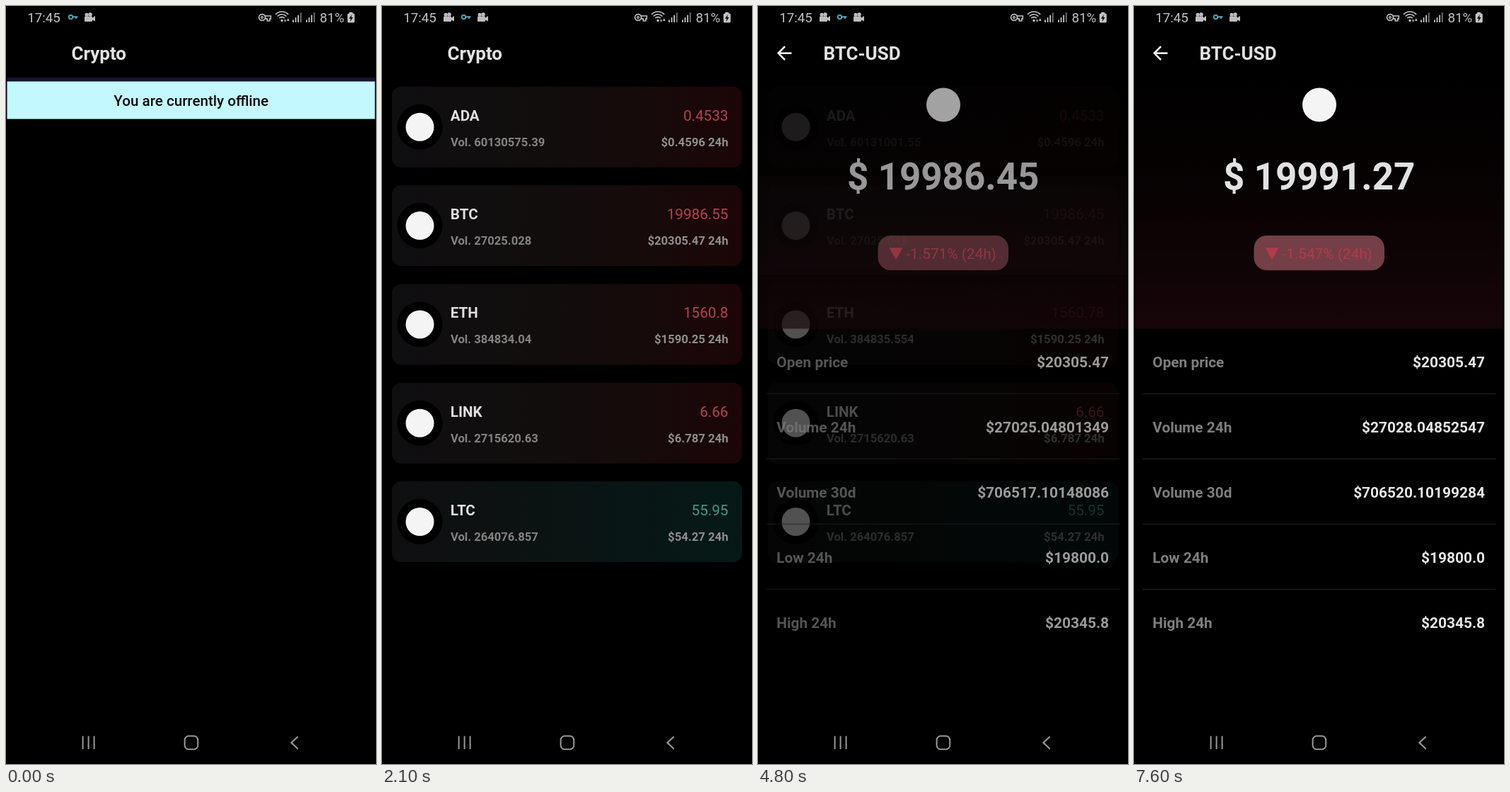
An HTML page with a canvas for the animation above (8100 ms loop, 523x1070 px).

```html
<!DOCTYPE html>
<html lang="en">
<head>
<meta charset="utf-8">
<title>Crypto ticker</title>
<style>
html, body { margin: 0; width: 100%; height: 100%; overflow: hidden; background: #000; }
canvas { display: block; width: 523px; height: 1070px; }
</style>
</head>
<body>
<canvas id="stage"></canvas>
<script>
const W = 523, H = 1070, LOOP = 8100;
const canvas = document.getElementById('stage');
const ratio = window.devicePixelRatio || 1;
canvas.width = W * ratio;
canvas.height = H * ratio;
const c = canvas.getContext('2d');

// Each track lists [time, value]; the latest entry counts.
const coins = [
  { name: 'ADA', open: '0.4596', price: [[0, '0.4529'], [1600, '0.4533']],
    vol: [[0, '60029453.55'], [1600, '60130575.39'], [2800, '60130648.12'], [3800, '60131001.55']] },
  { name: 'BTC', open: '20305.47', price: [[0, '19980.68'], [1700, '19986.55'], [2900, '19986.51'], [3900, '19986.45']],
    vol: [[0, '27029.982'], [1700, '27025.028'], [3100, '27025.031'], [3700, '27025.048']] },
  { name: 'ETH', open: '1590.25', price: [[0, '1560.09'], [1800, '1560.8'], [3200, '1560.79'], [4000, '1560.78']],
    vol: [[0, '384971.38'], [1800, '384834.04'], [3000, '384834.912'], [3600, '384835.554']] },
  { name: 'LINK', open: '6.787', price: [[0, '6.657'], [1700, '6.66']],
    vol: [[0, '2716866.92'], [1700, '2715620.63']] },
  { name: 'LTC', open: '54.27', up: true, price: [[0, '55.9'], [2100, '55.95']],
    vol: [[0, '264194.091'], [1800, '264076.857']] }
];

// [time, price, volume over 24 hours]
const trades = [
  [0, 19986.45, 27025.04801349],
  [5300, 19987.12, 27025.05213349],
  [5500, 19987.83, 27025.05613349],
  [5700, 19987.87, 27025.05733349]
];
for (let i = 1; i <= 9; i++) {
  trades.push([5900 + i * 100, 19987.87 + i * 0.138, 27025.05733349 + i * 0.12417631]);
}
trades.push(
  [6900, 19989.67, 27026.26104004],
  [7100, 19990.04, 27026.71826513],
  [7200, 19990.38, 27027.12073182],
  [7300, 19990.7, 27027.63418547],
  [7500, 19991.27, 27027.94216547],
  [7600, 19991.27, 27028.04852547]
);
const OPEN = 20305.47, VOL_GAP = 679492.05346737;

const latest = (track, t) => track.filter(e => e[0] <= t).pop();

function text(str, x, y, size, weight, color, align = 'left') {
  c.font = `${weight} ${size}px Roboto, sans-serif`;
  c.textAlign = align;
  c.fillStyle = color;
  c.fillText(str, x, y);
}

function box(x, y, w, h, r, fill) {
  c.beginPath();
  c.roundRect(x, y, w, h, r);
  c.fillStyle = fill;
  c.fill();
}

function disc(x, y, r, fill) {
  c.beginPath();
  c.arc(x, y, r, 0, Math.PI * 2);
  c.fillStyle = fill;
  c.fill();
}

function ring(x, y, r, color, width) {
  c.beginPath();
  c.arc(x, y, r, 0, Math.PI * 2);
  c.strokeStyle = color;
  c.lineWidth = width;
  c.stroke();
}

function line(points, color, width) {
  c.beginPath();
  points.forEach(([x, y]) => c.lineTo(x, y));
  c.strokeStyle = color;
  c.lineWidth = width;
  c.stroke();
}

function shape(points, fill) {
  c.beginPath();
  points.forEach(([x, y]) => c.lineTo(x, y));
  c.closePath();
  c.fillStyle = fill;
  c.fill();
}

function gradient(x0, y0, x1, y1, colors) {
  const g = c.createLinearGradient(x0, y0, x1, y1);
  colors.forEach((col, i) => g.addColorStop(i / (colors.length - 1), col));
  return g;
}

function camera(x) {
  const col = '#bdbdbd';
  disc(x + 3, 12.3, 2.5, col);
  disc(x + 8, 12, 2.8, col);
  box(x, 14.5, 11, 7.5, 1, col);
  shape([[x + 10.5, 17], [x + 15, 14], [x + 15, 21.5], [x + 10.5, 19.5]], col);
}

function smallKey(x) {
  const col = '#4fb3c4';
  ring(x + 4, 15.6, 2.8, col, 1.7);
  line([[x + 7, 15.3], [x + 14, 15.3]], col, 1.9);
  line([[x + 11.5, 15], [x + 11.5, 18]], col, 1.8);
}

function statusBar(t) {
  const col = '#c4c4c4';
  text('17:45', 30.3, 22.8, 18.7, 400, col);
  if (t < 400) {
    smallKey(87.5);
    camera(111);
  } else {
    camera(87);
    smallKey(111.5);
    camera(135);
  }
  // outlined key
  ring(362, 16, 4.4, col, 1.6);
  ring(362, 16, 1.4, col, 1.3);
  line([[366, 14], [374.3, 14], [374.3, 18], [372.8, 18], [372.8, 21], [369.2, 21], [369.2, 18], [366, 18]], col, 1.5);
  // wireless
  [12.5, 8.7, 4.9].forEach(r => {
    c.beginPath();
    c.arc(390, 20.5, r, -Math.PI * 0.76, -Math.PI * 0.24);
    c.strokeStyle = col;
    c.lineWidth = 1.6;
    c.stroke();
  });
  disc(390, 20.5, 1.7, col);
  shape([[393, 19.5], [396, 19.5], [394.5, 23]], col);
  shape([[397, 21], [400.5, 21], [398.7, 17]], col);
  [405, 424].forEach(x => {
    for (let i = 0; i < 4; i++) {
      const h = 3.5 + i * 3.4;
      box(x + i * 3.6, 23 - h, 1.8, h, 0, i < 3 ? col : '#777');
    }
  });
  text('81%', 443.4, 22.8, 18.7, 400, col);
  box(485.3, 8.7, 4.6, 3, 0.5, col);
  box(482.7, 10.6, 10, 12.8, 1.6, col);
  shape([[488.8, 12], [484.8, 17.8], [487.2, 17.8], [486.4, 22], [490.7, 16], [488.2, 16]], '#000');
}

function navBar() {
  const col = '#989898';
  [108.6, 116.6, 124.6].forEach(x => line([[x, 1030.5], [x, 1049]], col, 2));
  c.beginPath();
  c.roundRect(252.6, 1030.6, 18.6, 18.6, 5.5);
  c.strokeStyle = col;
  c.lineWidth = 2;
  c.stroke();
  line([[412.6, 1031.3], [403.4, 1040], [412.6, 1048.7]], col, 2.1);
}

function toolbar(t) {
  const col = '#e2e2e2';
  text(t < 4400 ? 'Crypto' : 'BTC-USD', 92.5, 76.3, 26, 700, col);
  if (t < 4400) return;
  line([[47.5, 66.6], [29, 66.6]], '#fff', 2.5);
  line([[38, 57.2], [28.7, 66.6], [38, 76]], '#fff', 2.5);
}

function banner(t) {
  box(1.5, 101, 520, 5.5, 0, '#16132f');
  if (t >= 1200) box(1.5, 101, 51, 5, 0, '#4f7f9c');
  box(1.5, 106.5, 520, 53, 0, '#c3f8ff');
  text('You are currently offline', 261.7, 141.2, 20.6, 500, '#0c0c0c', 'center');
}

function card(coin, y, t) {
  const tint = coin.up ? ['#0f0f10', '#0c1211', '#081615', '#061917'] : ['#0f0e10', '#110e0e', '#150b0b', '#1c0607'];
  box(14, y, 495, 114, 13, gradient(14, 0, 509, 0, tint));
  disc(53.5, y + 57, 32, '#000');
  disc(53.5, y + 57, 20, '#f4f4f4');
  text(coin.name, 96.8, y + 47.8, 20.6, 700, '#e0e0e0');
  text('Vol. ' + latest(coin.vol, t)[1], 97, y + 83.8, 16.6, 700, '#838383');
  text(latest(coin.price, t)[1], 489.5, y + 47.8, 20.7, 400, coin.up ? '#429c7e' : '#b3434f', 'right');
  text(`$${coin.open} 24h`, 489.5, y + 83.8, 16.7, 700, '#8e8e8e', 'right');
}

function list(t) {
  const top = t < 1300 ? 172.2 : 113.8;
  coins.forEach((coin, i) => card(coin, top + i * 139.3, t));
  if (t >= 4400) box(1.5, 240, 520, 139.5, 0, 'rgba(238,232,242,.115)');
}

function toast(alpha) {
  c.globalAlpha = alpha;
  box(123.5, 872.5, 275.5, 56, 28, '#4a494c');
  text('Screen recording started', 261.2, 907.3, 19.4, 400, '#f0f0f0', 'center');
  c.globalAlpha = 1;
}

function detail(t) {
  const [, price, vol] = latest(trades, t);
  const pct = ((price / OPEN - 1) * 100).toFixed(3);
  box(0, 102, W, 900, 0, '#000');
  box(1.5, 102, 520, 353.5, 0, gradient(0, 102, 0, 455, ['#000', '#080203', '#170509']));
  disc(262, 139.5, 24, '#f4f4f4');
  text('$ ' + Number(price.toFixed(2)), 261.7, 259.2, 52.9, 700, '#e2e2e2', 'center');
  box(169.5, 324, 184.5, 49, 18, '#743f47');
  shape([[185.5, 341.3], [204.5, 341.3], [195, 358.3]], '#b23c49');
  text(`${pct}% (24h)`, 209.3, 356.9, 20.8, 400, '#b23c49');
  const rows = [
    ['Open price', OPEN],
    ['Volume 24h', vol.toFixed(8)],
    ['Volume 30d', (vol + VOL_GAP).toFixed(8)],
    ['Low 24h', '19800.0'],
    ['High 24h', '20345.8']
  ];
  rows.forEach(([label, value], i) => {
    const y = 509.7 + i * 92;
    text(label, 26.3, y, 20.8, 700, '#7e7e7e');
    text('$' + value, 496, y, 20.9, 700, '#e6e6e6', 'right');
    if (i < 4) box(12, y + 37, 499.5, 1.2, 0, '#202020');
  });
}

function draw(now) {
  const t = Math.floor((now % LOOP) / 100) * 100;
  c.setTransform(ratio, 0, 0, ratio, 0, 0);
  c.fillStyle = '#000';
  c.fillRect(0, 0, W, H);
  if (t >= 400 && t < 4900) list(t);
  if (t < 1300) banner(t);
  if (t >= 4700) {
    c.globalAlpha = Math.min(1, (t - 4600) / 300);
    detail(t);
    c.globalAlpha = 1;
  }
  if (t >= 400 && t < 2100) toast(Math.min(1, (t - 300) / 400));
  toolbar(t);
  statusBar(t);
  navBar();
}

const start = performance.now();
function tick() {
  draw(performance.now() - start);
  requestAnimationFrame(tick);
}
tick();
</script>
</body>
</html>
```
